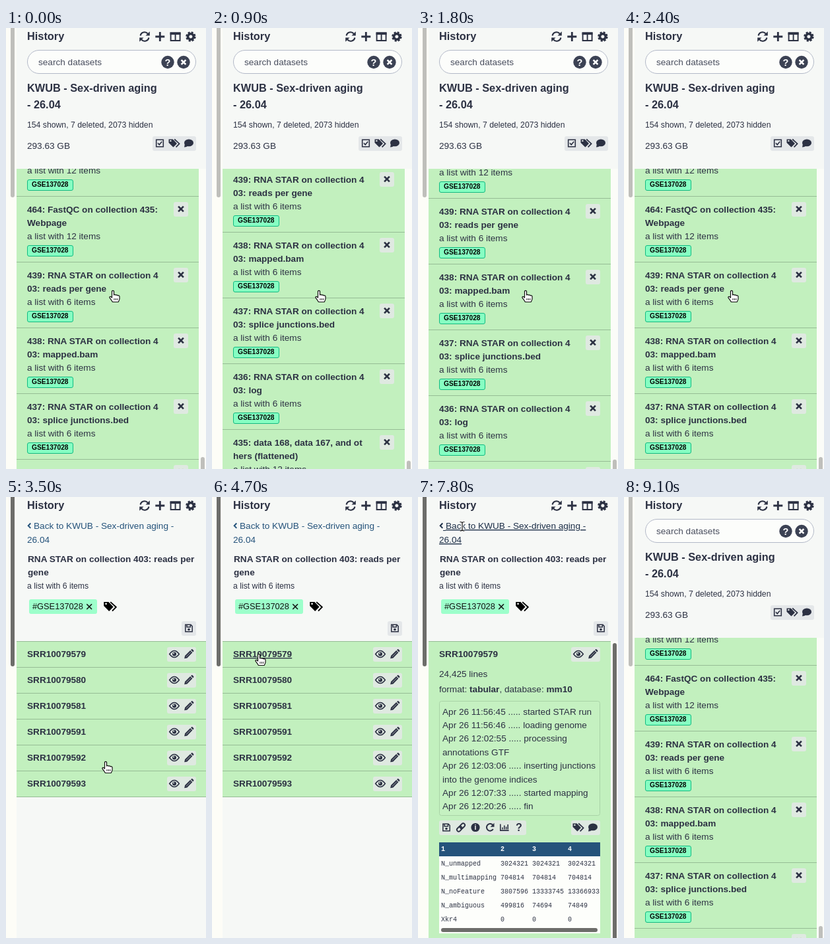
An HTML page for the animation above (9200 ms loop, 303 by 664 pixels).

```html
<!DOCTYPE html>
<html lang="en">
<head>
<meta charset="utf-8">
<title>History panel</title>
<style>
  html, body { margin: 0; width: 100%; height: 100%; overflow: hidden; background: #f6f8f6; }
  svg { display: block; width: 303px; height: 664px; }
  text { font-family: "Liberation Sans", Arial, sans-serif; white-space: pre; }
  .mono { font-family: "Liberation Mono", monospace; }
</style>
</head>
<body>
<svg id="stage" viewBox="0 0 303 664"></svg>
<script>
const LOOP = 9200, STEP = 100;
const INK = '#2c3143', GREEN = '#c2f0be', LINE = '#96bd95', BUTTON = '#e4e7e9', GREEN_BUTTON = '#dfe9e1';
const PANEL = '#f6f8f6', LINK = '#25537b', SOFT_INK = '#3c4254';

// Drawing helpers
const rect = (x, y, w, h, fill, extra = '') =>
  `<rect x="${x}" y="${y}" width="${w}" height="${h}" fill="${fill}" ${extra}/>`;

function text(x, y, str, { size = 13.6, bold, color = INK, line, cls = '', anchor = 'start' } = {}) {
  return `<text x="${x}" y="${y}" font-size="${size}" fill="${color}" class="${cls}" text-anchor="${anchor}"` +
    `${bold ? ' font-weight="700"' : ''}${line ? ' text-decoration="underline"' : ''}>${str}</text>`;
}

const group = (body, extra = '') => `<g ${extra}>${body}</g>`;
const clip = (id, x, y, w, h, body) =>
  `<clipPath id="${id}">${rect(x, y, w, h, '#000')}</clipPath>` + group(body, `clip-path="url(#${id})"`);
const stroke = (d, width, color = 'currentColor') =>
  `<path d="${d}" fill="none" stroke="${color}" stroke-width="${width}"/>`;
const fill = (d, color = 'currentColor') => `<path d="${d}" fill="${color}" fill-rule="evenodd"/>`;
const dot = (r, color = 'currentColor', x = 0, y = 0) => `<circle cx="${x}" cy="${y}" r="${r}" fill="${color}"/>`;
const ring = (r, width, extra = '') =>
  `<circle r="${r}" fill="none" stroke="currentColor" stroke-width="${width}" ${extra}/>`;
const glyph = (str, size, color) => text(0, size * .36, str, { size, bold: true, color, anchor: 'middle' });

// Icons are centred on 0,0
const ICONS = {
  sync: stroke('M-6.4-1.5A6.4 6.4 0 0 1 4.8-4.4M6.4 1.5A6.4 6.4 0 0 1-4.8 4.4', 2.2) +
    fill('M7.8-7.8v6.3H1.5zM-7.8 7.8V1.5h6.3z'),
  plus: stroke('M-7 0H7M0-7V7', 2.8),
  columns: stroke('M-7-5.5H7V6H-7zM0-5V6', 1.9) + fill('M-8-6.5H8v3.6H-8z'),
  gear: ring(4.3, 3.6) + ring(6.3, 2.8, 'stroke-dasharray="2.9 2.05"'),
  times: stroke('M-3.9-3.9L3.9 3.9M3.9-3.9L-3.9 3.9', 2.7),
  help: dot(9.7) + glyph('?', 14.5, '#fff'),
  clear: dot(9.7) + stroke('M-3.4-3.4L3.4 3.4M3.4-3.4L-3.4 3.4', 2.6, '#fff'),
  check: stroke('M-5.3-5.3H5.3V5.3H-5.3zM-3-.2L-.8 2.2L3.2-2.4', 1.6),
  tags: fill('M-8.5-6h6.2L4 .4-1.6 6-8.5-.8zM-6.8-3.6a1.2 1.2 0 1 0 2.4 0a1.2 1.2 0 1 0-2.4 0z') +
    stroke('M.2-6L7.6.7L2.6 5.8', 1.7),
  comment: '<ellipse cy="-.6" rx="7" ry="5.4" fill="currentColor"/>' + fill('M-6 1L-7 6Q-4 6-1 4z'),
  eye: stroke('M-7.3 0Q0-10 7.3 0Q0 10-7.3 0z', 1.6) + dot(3) + dot(1, '#dfe9e1', -1, -1),
  pencil: fill('M-6.8 6.8l.9-4.2L2.2-5.4 5.4-2.2-2.6 5.9zM3.1-6.2l1-1q.8-.6 1.6.2l1.3 1.3q.8.8.2 1.6l-1 1z') +
    stroke('M-4 4L3-3', .7, '#dfe9e1'),
  save: stroke('M-5.2-5.2H3L5.2-3V5.2H-5.2zM-3-5v3.2H2.4V-5', 1.5) + dot(1.8, 'currentColor', 0, 2),
  link: group('<rect x="-7.5" y="-2.7" width="8.6" height="5.4" rx="2.7"/><rect x="-1.1" y="-2.7" width="8.6" height="5.4" rx="2.7"/>',
    'transform="rotate(-45)" fill="none" stroke="currentColor" stroke-width="1.9"'),
  info: dot(6.6) + glyph('i', 10.5, '#fff'),
  redo: stroke('M4.6-3.2A5.3 5.3 0 1 0 4.8 2.6', 2) + fill('M6.5-6.7v5.9H.6z'),
  chart: stroke('M-6.2-5V4.6H6.6', 1.6) + stroke('M-3 3V0M-.2 3V-3M2.6 3V-1M5.2 3V-4.6', 1.6),
  ask: glyph('?', 16, INK),
};
const icon = (name, x, y, color = INK, scale = 1) =>
  group(ICONS[name], `transform="translate(${x} ${y}) scale(${scale})" color="${color}"`);

// Buttons of 22px each in one rounded bar
const bar = (x, y, names, bg = GREEN_BUTTON) =>
  rect(x, y, names.length * 22, 22, bg, 'rx="3"') +
  names.map((name, i) => icon(name, x + 11 + i * 22, y + 10.5)).join('');

// Timelines: [ms, ...values], linear between rows
const SCROLL = [[0, 0], [500, 0], [1300, 288], [1400, 288], [1800, 96], [2100, 96], [2400, 0]];
const POINTER = [
  [0, 162, 395], [1200, 162, 395], [1300, 163, 395], [2600, 163, 395], [3000, 151, 398],
  [3800, 151, 398], [4000, 149, 386], [4100, 149, 386], [4400, 108, 300], [4700, 71, 236],
  [5600, 71, 236], [5700, 70, 242], [6100, 150, 500], [6300, 170, 580], [6600, 150, 492],
  [6900, 130, 380], [7300, 90, 120], [7600, 67, 44],
  [8200, 67, 44], [8500, 50, 150], [8700, 34, 12],
];
function at(table, t) {
  const next = table.findIndex(row => row[0] > t);
  if (next < 0) return table[table.length - 1].slice(1);
  const a = table[next - 1], b = table[next], k = (t - a[0]) / (b[0] - a[0]);
  return a.slice(1).map((v, i) => v + (b[i + 1] - v) * k);
}

const HISTORY = 'KWUB - Sex-driven aging';
const HISTORY_ITEMS = [
  ['465: FastQC on collection 435:', 'RawData', 12],
  ['464: FastQC on collection 435:', 'Webpage', 12],
  ['439: RNA STAR on collection 4', '03: reads per gene', 6],
  ['438: RNA STAR on collection 4', '03: mapped.bam', 6],
  ['437: RNA STAR on collection 4', '03: splice junctions.bed', 6],
  ['436: RNA STAR on collection 4', '03: log', 6],
  ['435: data 168, data 167, and ot', 'hers (flattened)', 12],
  ['404: Cutadapt on collection 72:', 'Report', 6],
  ['403: Cutadapt on collection 72:', 'Reads', 6],
];

function historyItem([first, second, count], i, scroll, hover) {
  const y = Math.round(154 + i * 99 - scroll);
  const title = { bold: true, line: hover && i === 2 };
  return rect(16, y, 276, 1, LINE) +
    text(32, y + 25, first, title) + text(32, y + 45, second, title) +
    text(32, y + 65, `a list with ${count} items`) +
    rect(32.5, y + 74.5, 69, 16, '#86ffc2', 'rx="2.5" stroke="#13b981"') +
    text(39, y + 85, 'GSE137028', { size: 10.2, bold: true, color: '#000' }) +
    rect(254, y + 9, 22, 22, GREEN_BUTTON, 'rx="3"') + icon('times', 265, y + 19.5);
}

function historyView(scroll, hover, thumb) {
  const items = HISTORY_ITEMS.map((item, i) => historyItem(item, i, scroll, hover)).join('');
  return rect(32.5, 33.5, 255, 35, '#fcfdfb', 'rx="17.5" stroke="#b3b9c8"') +
    text(49, 56, 'search datasets', { color: '#494e5e' }) +
    icon('help', 245, 51.5, SOFT_INK) + icon('clear', 269, 51.5, SOFT_INK) +
    text(32, 96, HISTORY, { size: 16.32, bold: true }) +
    text(32, 121, '- 26.04', { size: 16.32, bold: true }) +
    text(32, 150, '154 shown, 7 deleted, 2073 hidden', { size: 12.24 }) +
    text(32, 182, '293.63 GB') +
    bar(222, 163, ['check', 'tags', 'comment'], BUTTON) +
    clip('list', 16, 212, 276, 452, rect(16, 212, 276, 452, GREEN) + items) +
    rect(292, 212, 11, 452, '#fbfcf8') +
    rect(295, 646 + scroll * 11 / 288, 6, 40, thumb, 'rx="3"');
}

const LOG = ['11:56:45 ..... started STAR run', '11:56:46 ..... loading genome', '12:02:55 ..... processing',
  'annotations GTF', '12:03:06 ..... inserting junctions', 'into the genome indices',
  '12:07:33 ..... started mapping', '12:20:26 ..... fin'];
const TABLE = [['1', '2', '3', '4'], ['N_unmapped', '3024321', '3024321', '3024321'],
  ['N_multimapping', '704814', '704814', '704814'], ['N_noFeature', '3807596', '13333745', '13366933'],
  ['N_ambiguous', '499816', '74694', '74849'], ['Xkr4', '0', '0', '0']];
const COLUMNS = [35, 125, 173, 227];

function details() {
  const bold = s => `<tspan font-weight="700">${s}</tspan>`;
  const log = LOG.map((s, i) =>
    text(37, Math.round(327.6 + i * 20.4), /^\d/.test(s) ? 'Apr 26 ' + s : s)).join('');
  const cells = TABLE.map((row, r) => row.map((s, c) =>
    text(COLUMNS[c], 533 + r * 21 + (r ? 1 : 0), s,
      { size: 10, cls: 'mono', bold: !r, color: r ? INK : '#fff' })).join('')).join('');
  return text(32, 271, '24,425 lines') +
    text(32, 294, `format: ${bold('tabular')}, database: ${bold('mm10')}`) +
    rect(32.5, 307.5, 243, 172, '#c5f1c1', 'rx="3" stroke="#a9d3a7"') + log +
    bar(32, 487, ['save', 'link', 'info', 'redo', 'chart', 'ask']) + bar(232, 487, ['tags', 'comment']) +
    rect(32, 520, 244, 137, '#fdfefb') + rect(32, 520, 244, 21, LINK) +
    clip('table', 32, 520, 244, 137, cells) +
    rect(35, 649, 237, 6, '#6d6d6a', 'rx="3"');
}

const RUNS = ['79', '80', '81', '91', '92', '93'];

function collectionView(q, hoverRow, thumb) {
  const extra = q < 5300 ? 0 : q < 5400 ? 90 : q < 5500 ? 270 : 460;
  const narrow = extra > 0, width = narrow ? 276 : 287;
  const rows = RUNS.map((run, i) => {
    const y = 217 + i * 39 + (i ? extra : 0);
    return rect(16, y, width, 40 + (i ? 0 : extra), GREEN) + rect(16, y, width, 1, LINE) +
      text(32, y + 24, 'SRR100795' + run, { bold: true, line: i === hoverRow }) +
      bar(narrow ? 232 : 244, y + 9, ['eye', 'pencil']);
  }).join('');
  const hot = q >= 7500, link = { color: hot ? '#1d2f48' : LINK, line: hot };
  return stroke('M37.3 39.5L33.7 43.2L37.3 46.9', 2, link.color) +
    (hot ? rect(38, 50, 4, 1, link.color) : '') +
    text(42, 48, `Back to ${HISTORY} -`, link) + text(32, 69, '26.04', link) +
    text(33, 98, 'RNA STAR on collection 403: reads per', { bold: true }) +
    text(33, 118, 'gene', { bold: true }) +
    text(32, 138, 'a list with 6 items', { size: 12.24 }) +
    rect(35, 154, 103, 22, '#9dffcb', 'rx="3"') +
    text(40, 169, '#GSE137028', { size: 12.8, color: '#111' }) +
    stroke('M122.3 161.3L130 169M130 161.3L122.3 169', 1.6, '#111') +
    icon('tags', 158, 165, '#000', 1.15) +
    bar(266, 187, ['save'], BUTTON) +
    rows + rect(16, 217 + 39 * 6 + extra, width, 1, LINE) +
    (narrow ? clip('details', 16, 250, 276, extra, details()) : '') +
    (extra > 200 ? rect(292, 217, 11, 447, '#fbfcf8') + rect(295, 220, 6, 460, thumb, 'rx="3"') : '');
}

const HAND = '<path d="M-1.5 1.2Q0-.6 1.5 1.2V7Q3 5.8 4.4 7.2Q6 6.4 7.2 7.9Q9.2 7.2 10 9V13Q9.6 15 8.2 17.5H-.6Q-2.4 14.5-5 11.2Q-5.4 9.2-3.4 9.4L-1.5 11z" ' +
  'fill="#fff" stroke="#111" stroke-width="1.2" stroke-linejoin="round"/>' + stroke('M2 12V15M4.4 12V15M6.8 12V15', .9, '#111');
const BEAM_PATH = 'M-3.5-6.5Q0-6.5 0-4.8Q0-6.5 3.5-6.5M0-5V5.5M-3.5 7Q0 7 0 5.2Q0 7 3.5 7';
const BEAM = stroke(BEAM_PATH, 2.8, '#fff') + stroke(BEAM_PATH, 1.2, '#111');

function scene(q) {
  const [x, y] = at(POINTER, q), [scroll] = at(SCROLL, q);
  const thumb = q >= 3300 && q < 9100 ? '#6d6d6a' : '#bfbfbb';
  const inCollection = q >= 3500 && q < 7900;
  const hoverRow = q >= 3900 && q < 5700 ? Math.floor((y - 217) / 39) : -1;
  return rect(0, 0, 16, 664, '#fdfdf7') + rect(16, 0, 287, 664, PANEL) +
    rect(7, -10, 6, 265, thumb, 'rx="3"') +
    text(32, 18, 'History', { size: 16.32, bold: true }) +
    ['sync', 'plus', 'columns', 'gear'].map((name, i) => icon(name, 210 + i * 23.3, 13)).join('') +
    (inCollection ? collectionView(q, hoverRow, thumb) : historyView(scroll, q < 3500 && x < 154, thumb)) +
    (q < 8800 ? group(q < 5700 ? HAND : BEAM, `transform="translate(${Math.round(x)} ${Math.round(y)})"`) : '');
}

const stage = document.getElementById('stage'), start = performance.now();
let shown = -1;
function tick() {
  const t = (performance.now() - start) % LOOP;
  const q = Math.floor(t / STEP) * STEP;
  if (q !== shown) stage.innerHTML = scene(shown = q);
  requestAnimationFrame(tick);
}
tick();
</script>
</body>
</html>
```
